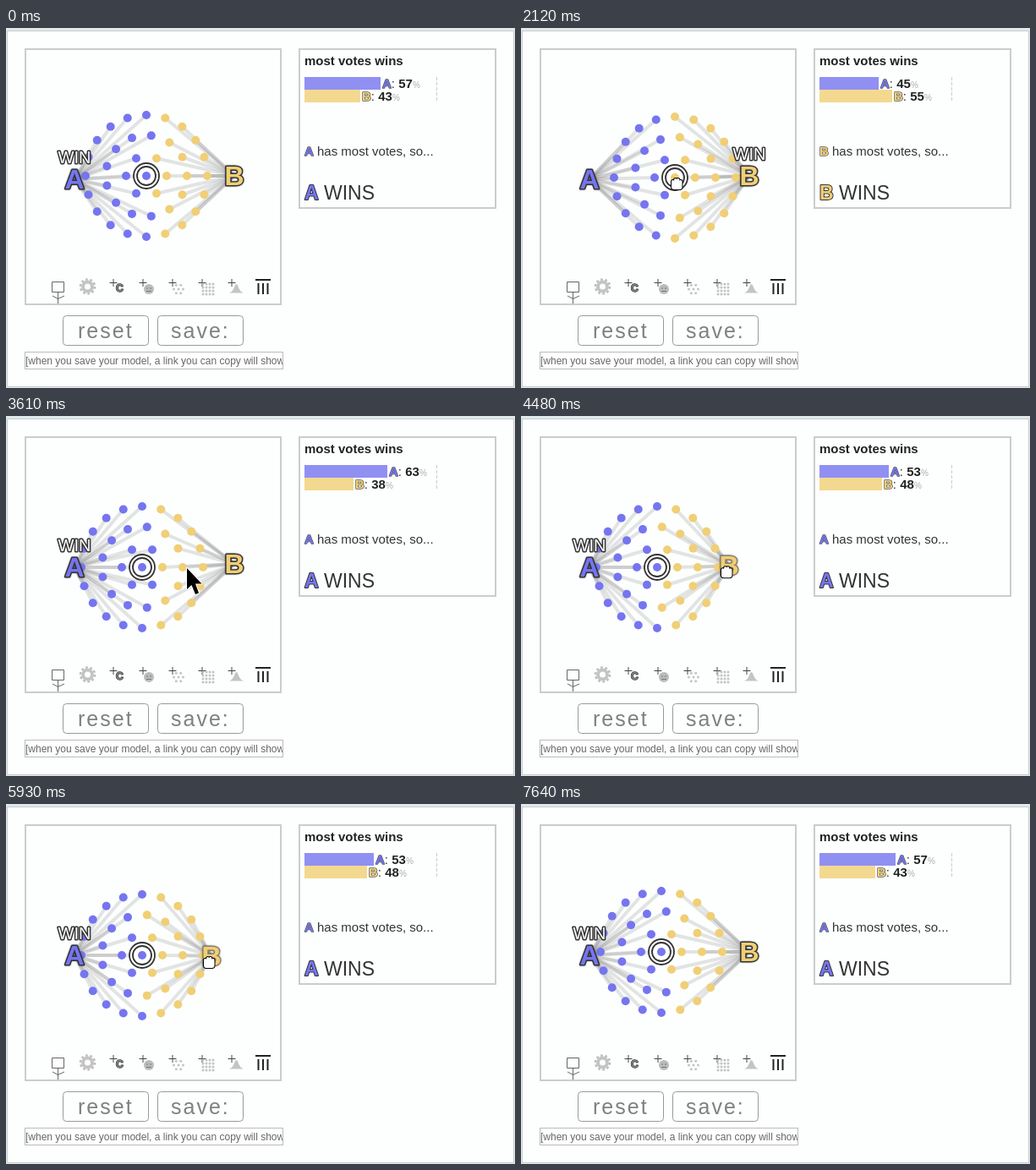
An HTML page with a canvas for the animation above (8710 ms loop, 602x426 px).

```html
<!DOCTYPE html>
<html lang="en">
<head>
<meta charset="utf-8">
<title>Most votes wins</title>
<style>
  html, body { margin: 0; width: 100%; height: 100%; overflow: hidden; background: #fdfefe; }
  svg, canvas { position: absolute; left: 0; top: 0; width: 602px; height: 426px; }
  text { font-family: "Liberation Sans", Arial, sans-serif; font-size: 15px; fill: #333; white-space: pre; }
  .bold { font-weight: bold; fill: #222; }
  .key { font-weight: bold; stroke: #555; stroke-width: 1.4px; paint-order: stroke; stroke-linejoin: round; }
  .small { font-size: 10px; fill: #aaa; }
  .big { font-size: 23px; }
  .big .key { stroke: #333; stroke-width: 2px; }
  .box { fill: none; stroke: #ccc; stroke-width: 2; }
  .btn rect { fill: #fdfefe; stroke: #999; }
  .btn text { font-size: 25px; letter-spacing: 2px; fill: #808080; }
  .btn.hover rect { stroke: #444; }
  .btn.hover text { fill: #444; }
  .link { font-size: 12px; fill: #666; }
</style>
</head>
<body>
<svg viewBox="0 0 602 426">
  <defs>
    <clipPath id="field"><rect x="23" y="384" width="304" height="20"/></clipPath>
  </defs>
  <rect width="602" height="426" fill="#dfeaec"/>
  <rect x="1.5" y="3.5" width="599" height="421" fill="#fdfefe" stroke="#ccc"/>
  <rect class="box" x="23" y="25" width="302" height="302"/>
  <rect class="box" x="347" y="25" width="232" height="188"/>

  <g id="tools" fill="none" stroke="#666">
    <path d="M54.5 300.5h14v12h-14zM61.500 313V326M55 317L61.500 320.500L69 317"/>
    <circle cx="96.5" cy="306" r="8.500" stroke="#bbb" stroke-width="2.500" stroke-dasharray="2.670"/>
    <circle cx="96.5" cy="306" r="5.500" stroke="#c4c4c4" stroke-width="4"/>
    <text x="130" y="312" class="key" style="font-size:12px;fill:#888;stroke:#333">C</text>
    <circle cx="169" cy="309" r="6" fill="#bbb" stroke="none"/>
    <path d="M166 308h2M170 308h2M166 311.500h6" stroke="#777"/>
    <path d="M264 313.500C270 312 270 303 272.500 303S275 312 281 313.500z" fill="#c4c4c4" stroke="none"/>
    <path d="M295 298H313M298.500 302V315M304 302V315M309.500 302V315" stroke="#222" stroke-width="2"/>
  </g>

  <text class="bold" x="353" y="44">most votes wins</text>
  <path d="M509.500 58V88" stroke="#ccc" stroke-dasharray="4 2"/>
  <g id="bars"></g>
  <text x="353" y="151"><tspan class="key" data-win></tspan> has most votes, so...</text>
  <text class="big" x="353" y="203"><tspan class="key" data-win></tspan> WINS</text>

  <g class="btn" id="reset"><rect x="67.5" y="340.5" width="101" height="35" rx="4"/><text x="85" y="367">reset</text></g>
  <g class="btn"><rect x="179.5" y="340.5" width="101" height="35" rx="4"/><text x="195" y="367">save:</text></g>
  <rect x="22.5" y="383.5" width="305" height="20" fill="#fff" stroke="#bbb"/>
  <text class="link" x="23" y="398" clip-path="url(#field)">[when you save your model, a link you can copy will show here]</text>
</svg>
<canvas width="602" height="426"></canvas>
<script>
const LOOP = 8710, TICK = 120, RESET = 7250, TAU = Math.PI * 2;
const COLOR = { A: '#7575f0', B: '#f0cf75' };
const BAR = { A: '#9090f2', B: '#f3d98f' };
const HOME = { A: { x: 81, y: 179 }, B: { x: 270, y: 175 }, crowd: { x: 166, y: 175 } };
const GRIP = { B: { x: -3, y: 7 }, crowd: { x: 2, y: 7 } };
const OFFSTAGE = { x: 95, y: 427 };
const ctx = document.querySelector('canvas').getContext('2d');
const $ = id => document.getElementById(id);

// Mouse moves: start, ticks, end x, end y, what is dragged
const MOVES = [
  [500, 3, 167, 272], [890, 2, 175, 203], [1150, 2, 173, 184], [1390, 1, 168, 182],
  [1760, 4, 184, 184, 'crowd'], [2750, 5, 163, 186, 'crowd'],
  [3480, 2, 214, 180], [3720, 4, 267, 182],
  [4240, 4, 235, 185, 'B'], [4760, 2, 223, 177, 'B'], [5660, 1, 221, 177, 'B'],
  [5810, 2, 240, 187, 'B'], [6080, 1, 253, 187, 'B'],
  [6480, 3, 212, 247], [6870, 3, 120, 358], [7400, 3, OFFSTAGE.x, OFFSTAGE.y]
];

const dist = (p, q) => Math.hypot(p.x - q.x, p.y - q.y);

// Replays the moves up to time t
function pose(t) {
  const s = { ...HOME, mouse: OFFSTAGE };
  for (const [start, ticks, x, y, item] of MOVES) {
    if (start > t) break;
    const p = Math.min(1, (Math.floor((t - start) / TICK) + 1) / ticks), m = s.mouse;
    s.mouse = { x: m.x + (x - m.x) * p, y: m.y + (y - m.y) * p };
    s.held = item;
    if (item) s[item] = { x: s.mouse.x - GRIP[item].x, y: s.mouse.y - GRIP[item].y };
  }
  return t < RESET ? s : { ...s, ...HOME };
}

// Concentric rings of voters, 24px apart
const VOTERS = [{ x: 0, y: 0 }];
[6, 13, 20].forEach((n, ring) => {
  for (let k = 0; k < n; k++) {
    const r = 24 * (ring + 1), a = k / n * TAU;
    VOTERS.push({ x: r * Math.cos(a), y: -r * Math.sin(a) });
  }
});

function disc(p, r, fill) {
  ctx.beginPath();
  ctx.arc(p.x, p.y, r, 0, TAU);
  if (fill) { ctx.fillStyle = fill; ctx.fill(); } else ctx.stroke();
}

function label(str, x, y, font, fill, edge) {
  ctx.font = font + ' "Liberation Sans", Arial, sans-serif';
  ctx.textAlign = 'center';
  ctx.lineJoin = 'round';
  ctx.lineWidth = 3;
  ctx.strokeStyle = edge;
  ctx.fillStyle = fill;
  ctx.strokeText(str, x, y);
  ctx.shadowBlur = 0;
  ctx.fillText(str, x, y);
}

function candidate(id, p, wins, held) {
  ctx.shadowColor = 'rgba(0,0,0,.4)';
  ctx.shadowBlur = 2;
  label(id, p.x, p.y + 10.5, 'bold 32px', COLOR[id], held ? '#8a8068' : '#333');
  if (wins) label('WIN', p.x, p.y - 19, '20px', '#fff', '#333');
}

const ARROW = new Path2D('M0 0V25L5.500 20L10 31L14 29.500L10 18.500H17.500Z');

// A hand with the index finger stretched by the given length
function hand(stretch) {
  const path = new Path2D();
  for (let i = 0; i < 4; i++) {
    const extra = i === 0 ? stretch : 0;
    path.roundRect(-6 + 3.1 * i, -4 - (i % 3 ? 2 : 0) - extra, 3.2, 7 + extra, 1.6);
  }
  path.roundRect(-6, -1, 12.5, 8, 3);
  return path;
}
const GRAB = hand(0), POINT = hand(7);

function cursor({ mouse, crowd, B }, pointing) {
  if (mouse.y >= OFFSTAGE.y) return;
  const grab = Math.min(dist(mouse, crowd), dist(mouse, B)) < 9;
  const shape = grab ? GRAB : pointing ? POINT : ARROW;
  const arrow = shape === ARROW;
  ctx.save();
  ctx.translate(mouse.x, mouse.y);
  ctx.lineWidth = 2;
  ctx.strokeStyle = arrow ? '#fff' : '#000';
  ctx.fillStyle = arrow ? '#000' : '#fff';
  ctx.stroke(shape);
  ctx.fill(shape);
  ctx.restore();
}

function drawModel(s, pointing) {
  const count = { A: 0, B: 0 };
  const voters = VOTERS.map(v => {
    const p = { x: s.crowd.x + v.x, y: s.crowd.y + v.y };
    p.vote = dist(p, s.A) <= dist(p, s.B) ? 'A' : 'B';
    count[p.vote]++;
    return p;
  });
  const winner = count.A >= count.B ? 'A' : 'B';

  ctx.clearRect(0, 0, 602, 426);
  ctx.lineWidth = 4;
  ctx.strokeStyle = 'rgba(120,120,120,.2)';
  for (const v of voters) {
    ctx.beginPath();
    ctx.moveTo(v.x, v.y);
    ctx.lineTo(s[v.vote].x, s[v.vote].y);
    ctx.stroke();
  }
  disc(s.crowd, 15, '#fff');
  ctx.strokeStyle = '#333';
  ctx.lineWidth = 1.8;
  disc(s.crowd, 15);
  disc(s.crowd, 11);
  for (const v of voters) disc(v, 5, COLOR[v.vote]);
  for (const id of ['A', 'B']) candidate(id, s[id], winner === id, s.held === id);
  cursor(s, pointing);
  return { count, winner };
}

$('bars').innerHTML = ['A', 'B'].map((id, i) =>
  `<rect id="bar${id}" x="353" y="${58 + 15 * i}" height="15" fill="${BAR[id]}"/>
   <text id="tag${id}" y="${71 + 15 * i}"><tspan class="key" style="fill:${COLOR[id]}">${id}</tspan>: <tspan
     class="bold" id="pct${id}"></tspan><tspan class="small">%</tspan></text>`).join('');

// Toolbar: plus signs, then a scattered and a gridded crowd
let icons = '';
for (let x = 127; x < 280; x += 35) icons += `<path d="M${x - 4.5} 301.5h9m-4.5 -4.5v9" stroke="#444"/>`;
const dot = (x, y) => { icons += `<circle cx="${x}" cy="${y}" r="1.5" fill="#c4c4c4" stroke="none"/>`; };
dot(204, 309);
for (let k = 0; k < 6; k++) dot(204 + 5.5 * Math.cos(k * TAU / 6), 309 + 5.5 * Math.sin(k * TAU / 6));
for (let k = 0; k < 16; k++) dot(233 + k % 4 * 4, 303 + Math.floor(k / 4) * 4);
$('tools').insertAdjacentHTML('beforeend', icons);

function drawPanel({ count, winner }) {
  for (const id of ['A', 'B']) {
    const share = count[id] / VOTERS.length, width = Math.floor(share * 157);
    $('bar' + id).setAttribute('width', width);
    $('tag' + id).setAttribute('x', 355 + width);
    $('pct' + id).textContent = Math.round(share * 100);
  }
  document.querySelectorAll('[data-win]').forEach(el => {
    el.textContent = winner;
    el.style.fill = COLOR[winner];
  });
}

function frame(now) {
  const s = pose(now % LOOP);
  const pointing = Math.abs(s.mouse.x - 118) < 51 && Math.abs(s.mouse.y - 358) < 18;
  $('reset').classList.toggle('hover', pointing);
  drawPanel(drawModel(s, pointing));
  requestAnimationFrame(frame);
}
frame(0);
</script>
</body>
</html>
```
